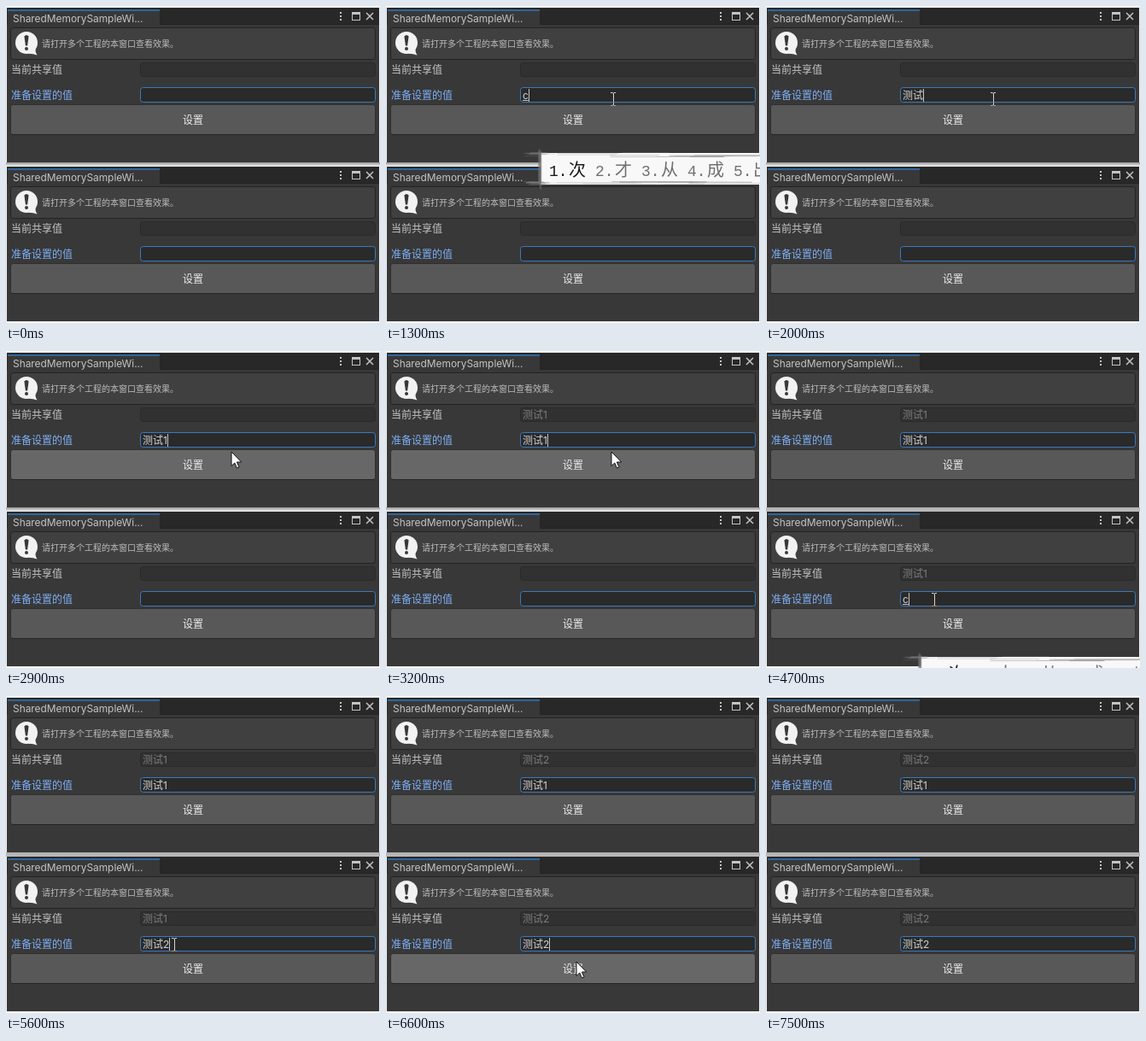
Write an HTML page that moves like this. It is 438 px wide and 371 px high and loops after 7.6 s.

```html
<!DOCTYPE html>
<html lang="zh-CN">
<head>
<meta charset="utf-8">
<title>Shared memory sample</title>
<style>
html, body { margin: 0; width: 100%; height: 100%; overflow: hidden; background: #383838; }
svg { display: block; width: 438px; height: 371px; }
text { font: 12px Inter, "Noto Sans CJK SC", "Noto Sans CJK", sans-serif; fill: #c4c4c4; white-space: pre; }
.title { font-size: 11.9px; }
.help { font-size: 10px; fill: #bdbdbd; }
.num { font: 18px "Liberation Mono", monospace; }
.han { font: 300 20px "Noto Sans CJK SC", "Noto Sans CJK", sans-serif; }
#beam { mix-blend-mode: difference; }
</style>
</head>
<body>
<svg id="stage" viewBox="0 0 438 371" xmlns="http://www.w3.org/2000/svg"></svg>
<script>
const LOOP = 7600, STEP = 100, ROW = 186;
const NS = "http://www.w3.org/2000/svg";
const stage = document.getElementById("stage");

function add(parent, tag, attrs, content) {
  const el = document.createElementNS(NS, tag);
  for (const k in attrs) el.setAttribute(k, attrs[k]);
  if (content) el.textContent = content;
  parent.appendChild(el);
  return el;
}
const rect = (p, x, y, width, height, fill, more) =>
  add(p, "rect", { x, y, width, height, fill, ...more });
const path = (p, d, more) => add(p, "path", { d, ...more });
const label = (p, x, y, str, more) => add(p, "text", { x, y, ...more }, str);
const show = (el, on) => el.setAttribute("visibility", on ? "visible" : "hidden");

// Rounded box with a crisp one pixel outline
const box = (p, x, y, w, h, fill, stroke) =>
  rect(p, x + .5, y + .5, w - 1, h - 1, fill, { stroke, rx: 3 });

function makeWindow(y) {
  const g = add(stage, "g", { transform: `translate(0 ${y})` });
  rect(g, 1, 2, 436, 181, "#383838");
  rect(g, 1, 2, 436, 20, "#282828");
  rect(g, 2, 4, 178, 18, "#383838");
  rect(g, 2, 4, 178, 2, "#2f659b");
  rect(g, 180, 21, 257, 1, "#232323");
  label(g, 8, 19, "SharedMemorySampleWi...", { class: "title" });

  for (const dy of [7, 11, 15]) rect(g, 391, dy, 2, 2, "#c4c4c4");
  rect(g, 405.5, 8.5, 9, 8, "none", { stroke: "#c4c4c4" });
  rect(g, 405, 7, 10, 3, "#c4c4c4");
  path(g, "M422 8l8 8m0-8l-8 8", { stroke: "#c4c4c4", "stroke-width": 1.5 });

  box(g, 5, 25, 428, 38, "#404040", "#232323");
  add(g, "circle", { cx: 24, cy: 43, r: 13, fill: "#f2f2f2" });
  path(g, "M26 55.8Q31 55.5 36.5 57.5Q33.5 53 35 49z", { fill: "#f2f2f2" });
  path(g, "M21.4 35.5Q24 32.5 26.6 35.5L25.1 46.5H22.9z", { fill: "#383838" });
  add(g, "circle", { cx: 24, cy: 50, r: 2, fill: "#383838" });
  label(g, 42, 48, "请打开多个工程的本窗口查看效果。", { class: "help" });

  label(g, 6, 79, "当前共享值");
  box(g, 157, 66, 276, 17, "#313131", "#2a2a2a");
  const shared = label(g, 160, 79, "", { style: "fill:#7c7c7c" });

  label(g, 6, 109, "准备设置的值", { style: "fill:#7fb0f8" });
  box(g, 157, 95, 276, 18, "#2a2a2a", "#3a79bb");
  const input = label(g, 160, 109, "", { style: "fill:#d2d2d2" });
  const under = rect(g, 160, 110, 0, 1, "#c4c4c4");
  const caret = rect(g, 160, 97, 1, 15, "#c4c4c4");

  const button = box(g, 5, 115, 428, 36, "#585858", "#303030");
  rect(g, 7, 150, 424, 1, "#242424");
  label(g, 219, 138, "设置", { "text-anchor": "middle", style: "fill:#eee" });
  return { y, shared, input, under, caret, button };
}

// Backdrop between and around the windows
const fade = add(add(stage, "defs", {}), "linearGradient", { id: "gap", x2: 0, y2: 1 });
const shades = [0, 1].map(offset => add(fade, "stop", { offset }));
rect(stage, 0, 0, 438, 371, "#f2f2f2");
rect(stage, 0, 183, 438, 5, "url(#gap)");
const wins = [makeWindow(0), makeWindow(ROW)];

let seed = 11;
const rnd = () => (seed = seed * 16807 % 2147483647) / 2147483647;

// Input method panel with brushed edges
const ime = add(stage, "g", {});
rect(ime, 181, 172, 257, 37, "#f8f8f8");
function brush(y, spread) {
  for (let i = 0; i < 18; i++) {
    const tail = i < 8;
    const x = tail ? 161 + rnd() * 10 : 180 + rnd() * 190;
    const w = tail ? 12 + rnd() * 20 : 30 + rnd() * 110;
    rect(ime, x, y + rnd() * spread, w, .5 + rnd() * .7, "#888",
      { opacity: .2 + rnd() * .4 });
  }
}
brush(171, 5);
brush(205, 4);
for (let i = 0; i < 8; i++)
  rect(ime, 178 + rnd() * 4, 166 + rnd() * 7, 1, 36 + rnd() * 7, "#777", { opacity: .35 + rnd() * .4 });
const choices = add(ime, "g", {});

const CANDIDATES = {
  "c": "次 才 从 成 出",
  "ce": "册 测 侧 策 厕",
  "ce's": "测试 测算 测 册",
  "ce'sh": "测试 侧身 测 册"
};
let listed = "";
function listChoices(key) {
  if (key === listed) return;
  listed = key;
  choices.textContent = "";
  let x = 191;
  CANDIDATES[key].split(" ").forEach((word, i) => {
    const style = `fill:${i ? "#707070" : "#181818"}`;
    label(choices, x, 198.5, i + 1 + ".", { class: "num", style });
    label(choices, x + 23, 198.5, word, { class: "han", style });
    x += 34 + 20 * word.length;
  });
}

const arrow = path(stage, "M0 0V16.5L3.8 13L6.4 19L9 17.9L6.4 12H11.7z",
  { fill: "#fff", stroke: "#111", "stroke-width": 1, "stroke-linejoin": "round" });
const beam = path(stage, "M-3 -7.5H-1M1 -7.5H3M-3 7.5H-1M1 7.5H3M-1 -7.5L.5 -6.5L1 -7.5M.5 -7V7M-1 7.5L.5 6.5L1 7.5",
  { id: "beam", fill: "none", stroke: "#fff" });

// Pointer: time, x, y
const ROUTE = [
  [100, 374, 6], [200, 325, 55], [300, 285, 90], [400, 266, 109],
  [2600, 266, 109], [2900, 264, 118], [3200, 264, 118],
  [3400, 247, 165], [3600, 213, 255], [3800, 197, 291],
  [6000, 197, 291], [6300, 223, 311], [6900, 223, 311],
  [7100, 262, 257], [7400, 429, 42]
];
function pointer(t) {
  if (t < 100 || t >= 7500) return null;
  const n = ROUTE.findIndex(p => p[0] >= t);
  if (n === 0) return ROUTE[0].slice(1);
  const [a, ax, ay] = ROUTE[n - 1], [b, bx, by] = ROUTE[n];
  const k = (t - a) / (b - a);
  return [ax + (bx - ax) * k, ay + (by - ay) * k];
}

// Last value whose start time has passed
const at = (t, list) => list.reduce((v, [start, next]) => t >= start ? next : v, "");
const TYPED = [
  [[1300, "c"], [1500, "ce"], [1700, "ce's"], [1800, "ce'sh"], [2000, "测试"], [2200, "测试1"]],
  [[4700, "c"], [4900, "ce"], [5100, "ce's"], [5200, "ce'sh"], [5400, "测试"], [5600, "测试2"]]
];
const SHARED = [
  [[3200, "测试1"], [6600, "测试2"]],
  [[3300, "测试1"], [6500, "测试2"]]
];
const between = (t, a, b) => t >= a && t < b;
const CARET = [[600, 3900], [4100, 7500]];
const pressed = t => between(t, 3100, 3200) || between(t, 6400, 6500);

function setText(el, str) {
  if (el.textContent !== str) el.textContent = str;
}

function draw(ms) {
  const t = Math.floor(ms % LOOP / STEP) * STEP;
  const pos = pointer(t);
  let overField = false, composing = null;

  wins.forEach((w, i) => {
    const str = at(t, TYPED[i]);
    const active = str in CANDIDATES;
    setText(w.input, str);
    setText(w.shared, at(t, SHARED[i]));
    const width = str ? w.input.getComputedTextLength() : 0;
    w.under.setAttribute("width", active ? width : 0);
    w.caret.setAttribute("x", Math.round(160 + width));
    show(w.caret, between(t, ...CARET[i]));
    if (active) composing = { str, y: w.y };

    const inside = (x, y0, y1) => pos && pos[0] >= x && pos[0] < 433 &&
      pos[1] >= w.y + y0 && pos[1] < w.y + y1;
    if (inside(157, 95, 113)) overField = true;
    const hover = inside(5, 115, 151);
    w.button.setAttribute("fill", !hover ? "#585858" : pressed(t) ? "#46607c" : "#676767");
  });

  show(ime, composing);
  if (composing) {
    listChoices(composing.str);
    ime.setAttribute("transform", `translate(0 ${composing.y})`);
  }

  show(arrow, pos && !overField);
  show(beam, pos && overField);
  if (pos) {
    const move = `translate(${Math.round(pos[0])} ${Math.round(pos[1])})`;
    arrow.setAttribute("transform", move);
    beam.setAttribute("transform", move);
  }

  // The shadow in the gap follows the focused window
  const k = Math.min(1, Math.max(0, (t - 3800) / 300));
  [[150, 176], [245, 188]].forEach(([a, b], i) => {
    const v = Math.round(a + (b - a) * k);
    shades[i].setAttribute("stop-color", `rgb(${v},${v},${v})`);
  });
}

const start = performance.now();
function tick() {
  draw(performance.now() - start);
  requestAnimationFrame(tick);
}
draw(0);
requestAnimationFrame(tick);
</script>
</body>
</html>
```
